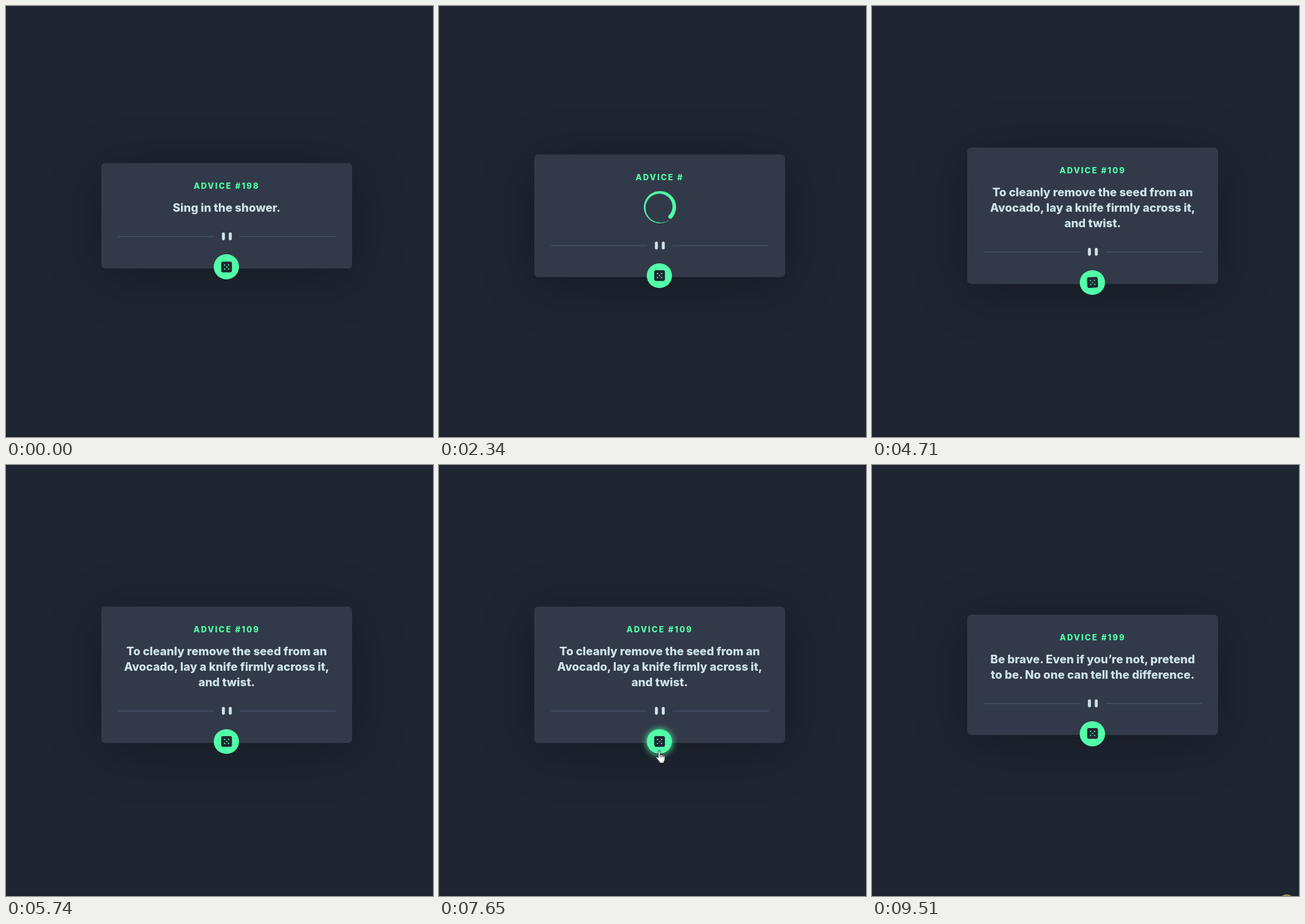
Recreate the animation shown at these times as an HTML page. Size 744 px wide and 752 px high, loop 9.58 s.

```html
<!DOCTYPE html>
<html lang="en">
<head>
<meta charset="utf-8">
<title>Advice generator</title>
<style>
  :root { --bg: #1f2632; --card: #323a49; --cyan: #cee3e9; --neon: #52ffa8; }
  html, body { margin: 0; width: 100%; height: 100%; overflow: hidden; background: var(--bg); }
  #stage { position: relative; width: 744px; height: 752px; overflow: hidden;
    font-family: Inter, "Open Sans", sans-serif; font-weight: 800; }
  #stage * { position: absolute; }
  svg { overflow: visible; }
  .strip { left: 0; right: 0; bottom: 0; height: 4px; background: #1d232f; }
  .card { left: 166px; width: 437px; border-radius: 7px; background: var(--card);
    box-shadow: 0 12px 90px rgba(0, 0, 0, .3); }
  .scene { inset: 0; text-align: center; white-space: pre; opacity: 0; }
  .label { left: 0; right: 0; top: 30px; font-size: 14px; line-height: 19px;
    letter-spacing: 2.2px; color: var(--neon); }
  .advice { left: 0; right: 0; top: 64.4px; font-size: 20px; line-height: 27.3px; color: var(--cyan); }
  .ring { left: 219px; top: 92.5px; width: 1px; height: 1px; transform-origin: 0 0;
    fill: var(--neon); animation: spin 1s linear infinite; animation-delay: -.66s; }
  @keyframes spin { to { transform: rotate(360deg); } }
  .divider { left: 29px; bottom: 48.9px; width: 379.6px; height: 13.7px; }
  .button { left: 196.2px; bottom: -19.3px; width: 43.7px; height: 43.7px; border-radius: 50%; background: var(--neon); }
  .glow { inset: 0; border-radius: 50%; box-shadow: 0 0 12px var(--neon); }
  .dice { left: 12.5px; top: 12.5px; width: 18.7px; height: 18.7px; }
  .cursor { left: 0; top: 0; }
  .cursor svg { left: 0; top: 0; width: 18px; height: 24px; fill: #fff; stroke: #000; stroke-linejoin: round; }
  .cursor .hand { left: -6px; }
  .spot { left: 708.5px; top: 749px; width: 27px; height: 27px; border-radius: 50%; background: #8b8a5c; }
</style>
</head>
<body>
<div id="stage">
  <div class="strip"></div>
  <div class="card">
    <svg class="divider" viewBox="0 0 444 16">
      <path fill="#4f5d74" d="M0 8h196v1H0zM248 8h196v1H248z"/>
      <g fill="#cee3e9"><rect x="212" width="6" height="16" rx="3"/><rect x="226" width="6" height="16" rx="3"/></g>
    </svg>
    <div class="button">
      <div class="glow"></div>
      <svg class="dice" viewBox="0 0 24 24">
        <rect width="24" height="24" rx="4" fill="#202733"/>
        <path d="M7.5 7.5h0M16.5 7.5h0M12 12h0M7.5 16.5h0M16.5 16.5h0" stroke="#52ffa8" stroke-width="3" stroke-linecap="round"/>
      </svg>
    </div>
  </div>
  <div class="cursor">
    <svg class="arrow" viewBox="0 0 18 24"><path d="M.5.5v16l3.7-3.5 2.5 5.6 2.4-1-2.4-5.5h5z"/></svg>
    <svg class="hand" viewBox="0 0 18 24">
      <path d="M4.5 13V2a1.7 1.7 0 0 1 3.4 0v6c.6-1 2.6-.8 2.9.5.8-.9 2.5-.6 2.8.6 1-.6 2.6 0 2.6 1.5V15c0 2-1.6 3.5-1.9 5.3V22H6.8v-1.5C5.5 18.4 2.6 15.5.9 12.8c-.8-1.5 1-2.6 2.2-1.5z"/>
      <path fill="none" d="M7.9 8v4M10.8 8.7v3.5M13.6 9.3v3"/>
    </svg>
  </div>
  <div class="spot"></div>
</div>
<script>
  const LOOP = 9580;
  const CENTER_Y = 365.9;
  const $ = selector => document.querySelector(selector);

  // Keyframes are [ms, properties, easing]; they hold until the next one by default.
  const play = (el, frames) => el.animate(
    frames.map(([ms, props, easing = 'step-end']) => ({ offset: ms / LOOP, easing, ...props })),
    { duration: LOOP, iterations: Infinity });

  const showDuring = (el, spans) => play(el, [
    [0, { opacity: spans[0][0] === 0 ? 1 : 0 }],
    ...spans.flatMap(([from, to]) => [
      ...(from ? [[from, { opacity: 1 }]] : []),
      [to, { opacity: 0 }]
    ])
  ]);

  // Ring that thickens clockwise from a hair to a round head.
  function ringMarkup() {
    const radius = 28, start = 57, sweep = 345, thick = 7, steps = 90;
    const point = (r, deg) => {
      const a = deg * Math.PI / 180;
      return [r * Math.cos(a), r * Math.sin(a)].map(v => v.toFixed(2));
    };
    const outer = [], inner = [];
    for (let i = 0; i <= steps; i++) {
      const k = i / steps, deg = start + sweep * k;
      outer.push(point(radius, deg));
      inner.unshift(point(radius - .5 - (thick - .5) * k, deg));
    }
    const [cx, cy] = point(radius - thick / 2, start + sweep);
    return `<svg class="ring"><polygon points="${[...outer, ...inner].join(' ')}"/>` +
      `<circle cx="${cx}" cy="${cy}" r="${thick / 2}"/></svg>`;
  }

  const advice = text => `<div class="advice">${text}</div>`;
  const scenes = [
    { number: '198', height: 183.5, spans: [[0, 1720]], body: advice('Sing in the shower.') },
    { number: '', height: 214.5, spans: [[1720, 2620], [4430, 4640], [7720, 8280]], body: ringMarkup() },
    { number: '181', height: 210.8, spans: [[2620, 4430]],
      body: advice('Rule number 1: Try not to die. Rule\nnumber 2: Don’t be a dick.') },
    { number: '109', height: 238, spans: [[4640, 7720]],
      body: advice('To cleanly remove the seed from an\nAvocado, lay a knife firmly across it,\nand twist.') },
    { number: '199', height: 210.8, spans: [[8280, LOOP]],
      body: advice('Be brave. Even if you’re not, pretend\nto be. No one can tell the difference.') }
  ];

  const card = $('.card');
  const sizes = [];
  for (const { number, height, spans, body } of scenes) {
    const scene = document.createElement('div');
    scene.className = 'scene';
    scene.innerHTML = `<div class="label">ADVICE #${number}</div>${body}`;
    card.prepend(scene);
    showDuring(scene, spans);
    for (const [from] of spans)
      sizes.push([from, { top: `${CENTER_Y - height / 2}px`, height: `${height}px` }]);
  }
  play(card, sizes.sort((a, b) => a[0] - b[0]));

  const hovers = [[3355, 4413], [6440, 7720]];
  showDuring($('.glow'), hovers);
  showDuring($('.hand'), hovers);
  showDuring($('.arrow'), [[2520, 3355], [4413, 4490], [5860, 6440], [7720, 8560]]);

  const turn = deg => ({ transform: `rotate(${deg}deg)` });
  play($('.dice'), [
    [0, turn(0)],
    ...hovers.flatMap(([enter, leave]) => [
      [enter, turn(0), 'ease'], [enter + 1000, turn(360)],
      [leave, turn(360), 'ease'], [leave + 1000, turn(0)]
    ])
  ]);

  const at = (x, y) => ({ transform: `translate(${x}px, ${y}px)` });
  play($('.cursor'), [
    [0, at(760, 610)],
    [2520, at(744, 600), 'linear'],
    [2820, at(520, 503), 'ease-out'],
    [3380, at(399, 479)],
    [4395, at(399, 479), 'linear'],
    [4430, at(721, 492)],
    [5860, at(722, 492), 'ease-out'],
    [6640, at(398, 484)],
    [7570, at(398, 484), 'ease-out'],
    [7650, at(383.5, 498)],
    [8420, at(384, 498), 'linear'],
    [8490, at(585, 672), 'linear'],
    [8560, at(722, 790)]
  ]);

  showDuring($('.spot'), [[9510, LOOP]]);
</script>
</body>
</html>
```
